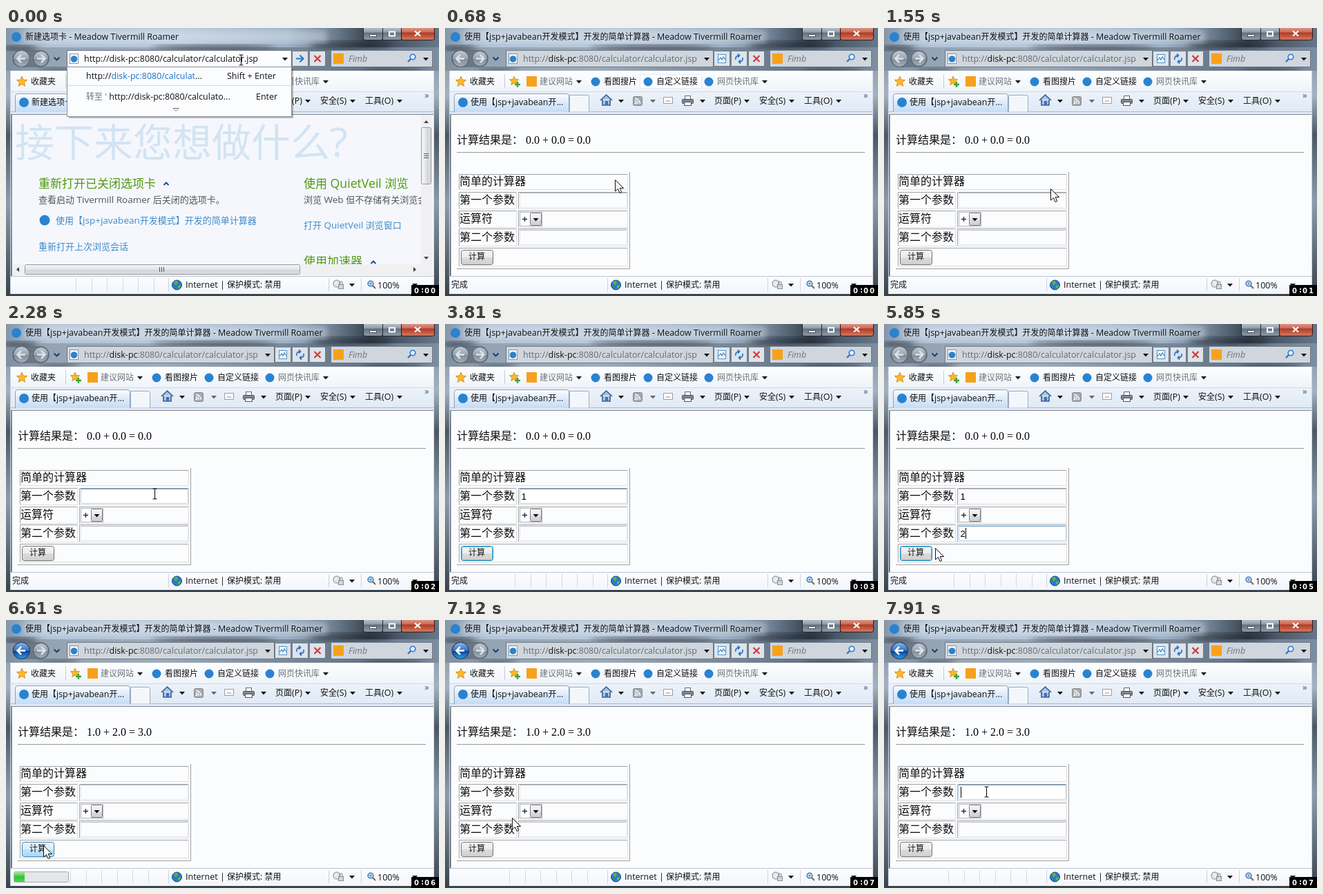
Animation of 627x389 px, one loop 8 s. Source, as an HTML page:

```html
<!DOCTYPE html>
<html lang="zh">
<head>
<meta charset="utf-8">
<title>Calculator</title>
<style>
html, body { margin: 0; width: 100%; height: 100%; overflow: hidden; background: #333d48; }
svg { display: block; width: 627px; height: 389px; }
text { font-family: "Open Sans", "Noto Sans CJK SC", "Noto Sans CJK", sans-serif; white-space: pre; }
.serif { font-family: "Liberation Serif", serif; }
.arial { font-family: "Liberation Sans", sans-serif; }
.clock { font: bold 10px "DejaVu Sans", sans-serif; fill: #fff; }
</style>
</head>
<body>
<svg id="stage" viewBox="0 0 627 389" xmlns="http://www.w3.org/2000/svg"></svg>
<script>
const LOOP = 8000;
const APP = 'Meadow Tivermill Roamer';
const PAGE = '使用【jsp+javabean开发模式】开发的简单计算器';
const GREEN = '#4c9a0e', LINK = '#3f8cc8', GREY = '#6d737a', PAPER = '#fbfcfe';

// --- drawing helpers ---
const R = (x, y, w, h, fill, more = '') =>
  `<rect x="${x}" y="${y}" width="${w}" height="${h}" fill="${fill}" ${more}/>`;
const box = (x, y, w, h, fill, stroke, r = 0) =>
  R(x + .5, y + .5, w - 1, h - 1, fill, `stroke="${stroke}" rx="${r}"`);
const P = (d, stroke, w = 1, fill = 'none') =>
  `<path d="${d}" stroke="${stroke}" stroke-width="${w}" fill="${fill}"/>`;
const C = (x, y, r, fill, more = '') => `<circle cx="${x}" cy="${y}" r="${r}" fill="${fill}" ${more}/>`;
const G = (id, body, more = '') => `<g id="${id}" ${more}>${body}</g>`;
const tri = (x, y, fill = '#111') => P(`M${x - 4} ${y - 2}h8l-4 4.5z`, 'none', 0, fill);
const vline = (x, y1, y2, c) => P(`M${x + .5} ${y1}V${y2}`, c);
const grad = (id, stops, across) =>
  `<linearGradient id="${id}" x2="${across ? 1 : 0}" y2="${across ? 0 : 1}">` +
  stops.map(([o, c]) => `<stop offset="${o}" stop-color="${c}"/>`).join('') + '</linearGradient>';

// Latin runs are set a little larger; text between ^ marks takes the accent colour.
const T = (x, y, s, size = 12, fill = '#111', accent = fill, more = '') =>
  `<text x="${x}" y="${y}" font-size="${size}" fill="${fill}" ${more}>` +
  s.split('^').map((part, i) => part.replace(/[\x20-\x7e]+/g, m =>
    `<tspan font-size="${size * 1.04}" fill="${i % 2 ? accent : fill}">${m}</tspan>`)).join('') + '</text>';

const appIcon = (x, y, r = 7) => C(x, y, r, '#2a83d0');
const star = (x, y, r = 8) => {
  let pts = '';
  for (let i = 0; i < 10; i++) {
    const a = i * Math.PI / 5, k = i % 2 ? r * .45 : r;
    pts += `${x + k * Math.sin(a)},${y - k * Math.cos(a)} `;
  }
  return `<polygon points="${pts}" fill="#fbb829" stroke="#c98512" stroke-width=".8"/>`;
};
const lens = (x, y, c) => C(x, y, 3.8, '#e6f3fd', `stroke="${c}" stroke-width="1.6"`);

const defs = '<defs>' +
  grad('glass', [[0, '#8496aa'], [.1, '#b4c4d6'], [.4, '#b9c9db'], [.65, '#9db0c5'],
    [.76, '#6b7c8e'], [.84, '#36424f'], [1, '#66788b']], true) +
  grad('navGlass', [[0, '#7f8fa0'], [.1, '#95a4b4'], [.35, '#9dacbc'], [.6, '#7e8e9e'], [.8, '#66778a'], [1, '#7d8ea0']], true) +
  grad('side', [[0, '#7a8a9b'], [.25, '#a3b2c2'], [.4, '#4c5864'], [.65, '#8c9bab'], [1, '#39434d']]) +
  grad('ctl', [[0, '#c6d0da'], [.45, '#929eaa'], [.5, '#64717e'], [1, '#8d9ba9']]) +
  grad('close', [[0, '#e6aea3'], [.45, '#cb6a59'], [.5, '#b03a27'], [1, '#d67c60']]) +
  grad('fav', [[0, '#fdfeff'], [1, '#eff4fa']]) +
  grad('tabs', [[0, '#ecf2fa'], [1, '#dfe9f5']]) +
  grad('tab', [[0, '#fbfdff'], [.5, '#dceafa'], [1, '#c5dcf5']]) +
  grad('disc', [[0, '#c3cbd4'], [.5, '#98a4b0'], [.52, '#7d8a97'], [1, '#a6b2be']]) +
  grad('blueDisc', [[0, '#8db9ea'], [.5, '#2f6fc3'], [.52, '#0c3f93'], [1, '#2fa2e8']]) +
  grad('btn', [[0, '#f4f4f4'], [.5, '#ebebeb'], [.51, '#dcdcdc'], [1, '#cfcfcf']]) +
  grad('hot', [[0, '#eaf6fd'], [.5, '#d8effc'], [.51, '#bde5fd'], [1, '#a7d9f5']]) +
  grad('thumb', [[0, '#f6f6f7'], [.5, '#e4e5e8'], [.51, '#d3d5d9'], [1, '#dcdde0']]) +
  grad('thumbV', [[0, '#f6f6f7'], [.5, '#e4e5e8'], [.51, '#d3d5d9'], [1, '#dcdde0']], true) +
  grad('status', [[0, '#fcfdff'], [1, '#f2f5fa']]) +
  grad('gain', [[0, '#a8eba4'], [.5, '#2fc330'], [1, '#4bdb4b']]) +
  '<clipPath id="pageClip"><rect x="9" y="126" width="592" height="217"/></clipPath>' +
  '<clipPath id="tabClip"><rect x="14" y="96" width="160" height="26"/></clipPath>' +
  '<filter id="soft"><feGaussianBlur stdDeviation="4"/></filter></defs>';

// --- window chrome ---
function chrome() {
  const blot = [[20, 29, 26, 4], [300, 28, 90, 4], [500, 25, 60, 6], [75, 60, 30, 3], [560, 60, 45, 3]]
    .map(([x, y, a, b]) => `<ellipse cx="${x}" cy="${y}" rx="${a}" ry="${b}" fill="#1b232b" opacity=".6" filter="url(#soft)"/>`).join('');
  return R(0, 0, 627, 389, 'url(#side)') + R(0, 0, 627, 31, 'url(#glass)') + R(0, 28, 627, 34, 'url(#navGlass)') + blot +
    vline(6, 62, 386, '#cdd7e2') + vline(619, 62, 386, '#cdd7e2') +
    R(25, 3, 440, 19, '#e5edf6', 'opacity=".4" filter="url(#soft)"') + appIcon(15, 13) +
    G('titleNew', T(28, 17, '新建选项卡 - ' + APP)) + G('titlePage', T(28, 17, PAGE + ' - ' + APP)) +
    box(517, -4, 29, 22, 'url(#ctl)', '#202a33', 3) + box(545, -4, 28, 22, 'url(#ctl)', '#202a33') +
    box(572, -4, 49, 22, 'url(#close)', '#3c1712', 3) +
    box(526, 9, 11, 4, '#fff', '#4a525b') + P('M555 5.500h8v6h-8z', '#fff', 2) +
    P('M592 4.500l8 7m0 -7l-8 7', '#fff', 2.2);
}

function navBar() {
  const button = x => box(x, 33, 24, 23, '#dfe4ea', '#727e8a');
  const arrow = (x, dir, c) => P(`M${x + 6 * dir} 44.500H${x - 5 * dir}M${x} 39l${-5.5 * dir} 5.500l${5.5 * dir} 5.500`, c, 2.6);
  const url = 'http://^disk-pc^:8080/calculator/calculator.jsp';
  return R(9, 32, 54, 25, '#55626f', 'rx="12.500" opacity=".6"') +
    C(22.5, 44.5, 12, 'url(#disc)', 'stroke="#505b66"') + arrow(22, 1, '#dde3e9') +
    G('back', C(22.5, 44.5, 12, 'url(#blueDisc)', 'stroke="#1b3566"') + arrow(22, 1, '#fff')) +
    C(50.5, 44.5, 11, 'url(#disc)', 'stroke="#505b66"') + arrow(51, -1, '#dde3e9') +
    P('M69.500 42.500l4 4l4 -4', '#173a66', 1.8) +
    G('addrEdit', box(88, 32, 326, 25, '#fcfdff', '#66727e') + T(113, 49, url) + tri(404, 45) +
      button(414) + P('M420 44.500h10m-4.500 -5l5 5l-5 5', '#2d76cf', 2.2)) +
    G('addrIdle', box(88, 32, 301, 25, '#d0d6dd', '#6d7884') + T(113, 49, url, 12, '#656b72', '#111') + tri(379, 45) +
      button(389) + box(395, 38, 12, 13, '#f3f9ff', '#4f93c9') + P('M396 47l3 -4l2 3l2 -4l3 4', '#3887c4', 1.2) +
      button(414) + P('M421 46q-1 -6 5 -6m-2 -2.500l2.500 2.500l-2.500 2.500M431 43q1 6 -5 6m2 2.500l-2.500 -2.500l2.500 -2.500', '#2d76cf', 1.8)) +
    button(439) + P('M446.500 40l9 9m0 -9l-9 9', '#cf3b35', 2.2) +
    box(92, 37, 13, 15, '#fbfdff', '#8795a4') + appIcon(98.5, 45, 4.8) +
    box(470, 32, 148, 25, '#d0d6dd', '#6d7884') + R(474, 37, 15, 15, '#f6a11c') +
    T(496, 49, 'Fimb', 12, '#70767d', undefined, 'font-style="italic"') +
    lens(589, 42, '#2d76cf') + P('M586 45l-4 4', '#2d76cf', 2.4) + tri(608, 45);
}

function toolbars() {
  const link = (x, s, fill) => appIcon(x, 78, 6.5) + T(x + 12, 82, s, 12, fill);
  const menu = (x, s, ax) => T(x, 110, s) + tri(ax, 106);
  return R(7, 62, 612, 31, 'url(#fav)') + R(7, 92, 612, 33, 'url(#tabs)') + P('M7 92.500H619', '#d0d9e5') +
    star(23, 78) + T(36, 82, '收藏夹') + vline(86, 67, 88, '#c3ccd7') +
    star(100, 77, 7) + P('M105 78v8m-4 -4h8', '#3da33c', 2.4) + R(118, 70, 15, 15, '#f6a11c') +
    T(137, 82, '建议网站', 12, GREY) + tri(194, 78) +
    G('linkHover', box(282, 67, 90, 21, '#fff', '#e1e8f1', 2)) +
    link(218, '看图搜片') + link(294, '自定义链接') + link(382, '网页快讯库', GREY) + tri(463, 78) +
    P('M7 121.500H619', '#a9b9cc') +
    `<path d="M13.500 122V99q0-3.500 3.500-3.500H176q3.500 0 3.500 3.500V122" fill="url(#tab)" stroke="#8ba0b9"/>` +
    `<path d="M180.500 121.500V97.500H206q2.500 0 2.500 2.500V121.500" fill="#f3f7fc" stroke="#9dafc4"/>` +
    G('tabIcon', appIcon(26, 108)) +
    G('tabBusy', C(26, 108, 6, 'none', 'stroke="#4d9bdf" stroke-width="2.400" stroke-dasharray="28 10"')) +
    G('tabNew', T(37, 112, '新建选项卡'), 'clip-path="url(#tabClip)"') +
    G('tabPage', T(37, 112, '使用【jsp+javabean开...'), 'clip-path="url(#tabClip)"') +
    P('M225 105l8.500 -8l8.500 8M228 104v8h11v-8', '#3a5c8d', 1.6, '#a9c4e6') + R(232, 106, 4, 6, '#3c72b8') + tri(255, 106) +
    box(272, 99, 14, 14, '#a5a9ae', '#85898e', 2) + C(276, 109, 1.5, '#fff') +
    P('M275 105.500a4.500 4.500 0 0 1 4.500 4.500M275 102.500a7.500 7.500 0 0 1 7.500 7.500', '#fff', 1.4) + tri(301, 106, '#666') +
    box(316, 100, 14, 10, '#f9fafc', '#9aa0a8') + P('M320 106h6', '#cc7d7d') +
    box(347, 98, 9, 6, '#fff', '#667') + box(343, 103, 17, 7, '#808890', '#4a5058', 1) + box(346, 107, 11, 6, '#fafafa', '#556') + tri(373, 106) +
    menu(390, '页面(P)', 437) + menu(455, '安全(S)', 502) + menu(520, '工具(O)', 570) + T(606, 102, '»', 13, '#38507c');
}

// --- new tab page with scrollbars ---
function newTab() {
  const chev = (x, y) => P(`M${x - 3.5} ${y + 2}l3.500 -3.500l3.500 3.500`, '#1c4e9a', 2);
  const body = T(13, 187, '接下来您想做什么?', 57, '#d2e4f3') +
    T(47, 232, '重新打开已关闭选项卡', 17, GREEN) + chev(232, 226) +
    T(47, 254, '查看启动 Tivermill Roamer 后关闭的选项卡。', 13, '#555') +
    appIcon(56, 279, 7.5) + T(72, 284, PAGE, 13, LINK) + T(47, 322, '重新打开上次浏览会话', 13, LINK) +
    T(431, 232, '使用 QuietVeil 浏览', 17, GREEN) + T(431, 254, '浏览 Web 但不存储有关浏览会话', 13, '#555') +
    T(431, 291, '打开 QuietVeil 浏览窗口', 13, LINK) + T(431, 345, '使用加速器', 17, GREEN) + chev(532, 340);
  return R(9, 126, 610, 234, '#f5f7fd') + G('', body, 'clip-path="url(#pageClip)"') +
    R(601, 126, 16, 217, '#f0f0f2') + R(9, 343, 608, 16, '#f0f0f2') +
    box(601, 144, 15, 83, 'url(#thumbV)', '#96999e', 2) + box(27, 343, 399, 15, 'url(#thumb)', '#96999e', 2) +
    P('M605 182.500h7m-7 3h7m-7 3h7M222.500 347v7m3 -7v7m3 -7v7', '#555') +
    P('M605 138l3.500 -4l3.500 4z', 'none', 0, '#444') + P('M605 332l3.500 4l3.500 -4z', 'none', 0, '#444') +
    P('M19 347l-4 3.500l4 3.500z', 'none', 0, '#444') + P('M590 347l4 3.500l-4 3.500z', 'none', 0, '#444');
}

// --- calculator page ---
function calculator() {
  const cell = (x, y, x2, y2) => P(`M${x + .5} ${y2}V${y + .5}H${x2}`, '#a3a3a3') + P(`M${x} ${y2 + .5}H${x2 + .5}V${y}`, '#dedede');
  const label = (x, y, s) => T(x, y, s, 16, '#111', undefined, 'font-weight="350"');
  const field = (n, y) => box(108, y, 156, 22, PAPER, '#e2e6ee', 1) + P(`M108 ${y + .5}h155`, '#b4b7bd') +
    G('hot' + n, box(108, y, 156, 22, '#fff', '#b3d3ec', 1) + P(`M108 ${y + .5}h155`, '#5f97c4')) +
    `<text id="val${n}" class="arial" x="110.500" y="${y + 16}" font-size="13.330"></text>` +
    R(111, y + 3, 1, 16, '#000', `id="caret${n}"`);
  const rows = [238, 265, 291, 319], ends = [262, 289, 316, 345];
  let grid = cell(20, 212, 264, 234) + cell(20, rows[3], 264, ends[3]);
  for (let i = 0; i < 3; i++) grid += cell(20, rows[i], 103, ends[i]) + cell(106, rows[i], 264, ends[i]);
  return R(9, 126, 610, 234, PAPER) + label(17, 168, '计算结果是：') +
    '<text id="result" class="serif" x="117" y="168" font-size="16"></text>' +
    P('M17 180.500H608', '#a0a0a0') + P('M17 181.500H608', '#eee') +
    P('M267.500 209V349.500H17', '#a0a0a0') + grid +
    label(21, 228, '简单的计算器') + label(21, 255, '第一个参数') + label(21, 282, '运算符') + label(21, 309, '第二个参数') +
    field(1, 239) + field(2, 293) +
    box(108, 267, 33, 21, '#fff', '#b3b6bc') + P('M112 277.500h7m-3.500 -3.500v7', '#14304f', 1.3) +
    box(123, 268, 17, 19, 'url(#btn)', '#7b7f85', 1) + tri(131.5, 278) +
    G('btnPlain', box(23, 322, 47, 22, 'url(#btn)', '#707070', 3)) +
    G('btnDefault', box(23, 322, 47, 22, 'url(#btn)', '#3c7fb1', 3) + box(24, 323, 45, 20, 'none', '#43c6ee', 2)) +
    G('btnHot', box(23, 322, 47, 22, 'url(#hot)', '#3c7fb1', 3)) + T(34, 336, '计算');
}

function statusBar() {
  let ticks = '';
  for (let x = 101; x < 220; x += 22.5) ticks += vline(Math.round(x), 363, 382, '#d3dae3');
  return R(7, 360, 612, 26, 'url(#status)') + P('M7 360.500H619', '#b9c3cf') +
    G('ticks', ticks) + vline(235, 363, 382, '#cbd3dd') +
    G('done', T(9, 377, '完成')) +
    G('load', box(11, 365, 80, 16, '#e4e6e9', '#a5aab0', 2) + R(12, 366, 15, 14, 'url(#gain)', 'id="gain"')) +
    C(247.5, 373, 7, '#2d78cb', 'stroke="#174e8f"') +
    P('M243 369q4 -4 6 0q-1 4 -4 4zM249 374q4 -3 4 1q-3 5 -4 3z', 'none', 0, '#59b542') +
    T(260, 377, 'Internet | 保护模式: 禁用') +
    vline(467, 363, 382, '#cbd3dd') + vline(514, 363, 382, '#cbd3dd') +
    C(479, 371, 5, '#e8ebee', 'stroke="#a2a8ae" stroke-width="1.500"') + box(481, 372, 8, 7, '#d4d8dc', '#868d94') +
    P('M483 372v-2a2 2 0 0 1 4 0v2', '#868d94', 1.2) + tri(501, 373) +
    lens(528, 371, '#3b78bc') + P('M531 374l4 4', '#8a6b3c', 2.2) + P('M526 371h4m-2 -2v4', '#3b78bc') +
    T(538, 378, '100%') + tri(592, 373);
}

function suggestions() {
  return R(91, 59, 325, 72, '#000', 'opacity=".25"') + box(88, 56, 326, 73, '#fbfcfe', '#8b9097') +
    T(116, 74, 'http://^disk-pc:8080/calculat^...', 12, '#111', '#1a70c8') + T(320, 74, 'Shift + Enter') +
    P('M89 83.500H413', '#d5d8dd') +
    T(116, 104, "转至 ' ^http://disk-pc:8080/calculato...^", 12, GREY, '#111') + T(362, 104, 'Enter') +
    P('M242 116.500h8l-4 4z', '#777', 1, '#fff');
}

const pointers =
  G('arrow', P('M0 0V16.500L4 13L6.500 19L9.200 17.800L6.700 12H12z', '#111', 1, '#fff')) +
  G('beam', P('M-3 -7.500H-1L0 -6.500L1 -7.500H3M0 -6.500V6.500M-3 7.500H-1L0 6.500L1 7.500H3', '#111', 1.1));
const clock = R(587, 373, 40, 16, '#000') +
  '<text class="clock" x="591" y="384.500">0</text><text class="clock" x="601" y="384">:</text>' +
  '<text class="clock" x="606" y="384.500">0</text><text class="clock" id="sec" x="615" y="384.500"></text>';

document.getElementById('stage').innerHTML = defs + chrome() + navBar() + toolbars() +
  G('newTab', newTab()) + G('calc', calculator()) + P('M8 125.500H619', '#7f8791') + vline(8, 125, 360, '#8d959f') +
  statusBar() + G('drop', suggestions()) + pointers + clock;

// --- timeline ---
const el = {};
document.querySelectorAll('[id]').forEach(n => { el[n.id] = n; });
const show = (id, on) => el[id].setAttribute('visibility', on ? 'inherit' : 'hidden');
const put = (id, s) => { if (el[id].textContent !== s) el[id].textContent = s; };

const SECONDS = [1310, 2160, 3130, 4150, 5090, 6080, 7110];
// time, x, y of each pointer position
const PATH = [
  [0, 340, 46], [680, 246, 220], [1310, 245, 222], [1410, 243, 228], [1550, 241, 233], [1670, 238, 236],
  [1820, 231, 245], [1940, 225, 246], [2060, 220, 246], [2160, 217, 246], [2280, 215, 246],
  [3930, 205, 252], [4050, 180, 268], [4150, 160, 279], [4270, 146, 299], [4390, 142, 302],
  [4810, 140, 303], [5700, 108, 317], [5850, 74, 325], [5970, 65, 326], [6080, 58, 327], [6190, 54, 327],
  [7000, 64, 317], [7110, 97, 287], [7220, 124, 264], [7370, 136, 256], [7490, 143, 252], [7610, 147, 250], [7910, 148, 249]
];

function draw(t) {
  const within = (a, b) => t >= a && t < b;
  const fresh = t < 680, sent = t >= 6610, busy = within(530, 680);
  const [, x, y] = PATH.filter(p => p[0] <= t).pop();
  const inside = (l, top, w, h) => !fresh && x >= l && x < l + w && y >= top && y < top + h;
  const over1 = inside(108, 239, 156, 22), over2 = inside(108, 293, 156, 22), overBtn = inside(23, 322, 47, 22);

  show('titleNew', fresh); show('titlePage', !fresh);
  show('addrEdit', t < 530); show('addrIdle', t >= 530); show('drop', t < 530);
  show('tabNew', fresh); show('tabPage', !fresh);
  show('tabIcon', !busy); show('tabBusy', busy);
  show('newTab', fresh); show('calc', !fresh);
  show('linkHover', within(680, 1550));
  show('back', sent);

  put('result', sent ? '1.0 + 2.0 = 3.0' : '0.0 + 0.0 = 0.0');
  put('val1', within(3810, 6610) ? '1' : '');
  put('val2', within(5550, 6610) ? '2' : '');
  show('hot1', over1 || within(2280, 4540) || t >= 7760);
  show('hot2', over2 || within(4540, 6460));
  show('caret1', within(2830, 3810) || t >= 7760);
  show('caret2', within(4540, 6190));
  el.caret2.setAttribute('x', t < 5550 ? 111 : 118);

  const active = within(3810, 6610);
  show('btnHot', overBtn); show('btnDefault', active && !overBtn); show('btnPlain', !active && !overBtn);

  show('ticks', fresh || t >= 3810);
  el.ticks.setAttribute('transform', `translate(${t < 6310 ? 0 : -8})`);
  show('done', within(680, 6310));
  show('load', within(6310, 7000));
  el.gain.setAttribute('width', t < 6460 ? 5 : t < 6730 ? 15 : t < 6850 ? 36 : 62);

  const beam = fresh || over1 || over2, typing = within(3810, 3930);
  show('beam', beam && !typing); show('arrow', !beam && !typing);
  el[beam ? 'beam' : 'arrow'].setAttribute('transform', `translate(${x + .5} ${y + .5})`);
  put('sec', String(SECONDS.filter(s => s <= t).length));
}

function tick() {
  draw(performance.now() % LOOP);
  requestAnimationFrame(tick);
}
tick();
</script>
</body>
</html>
```
